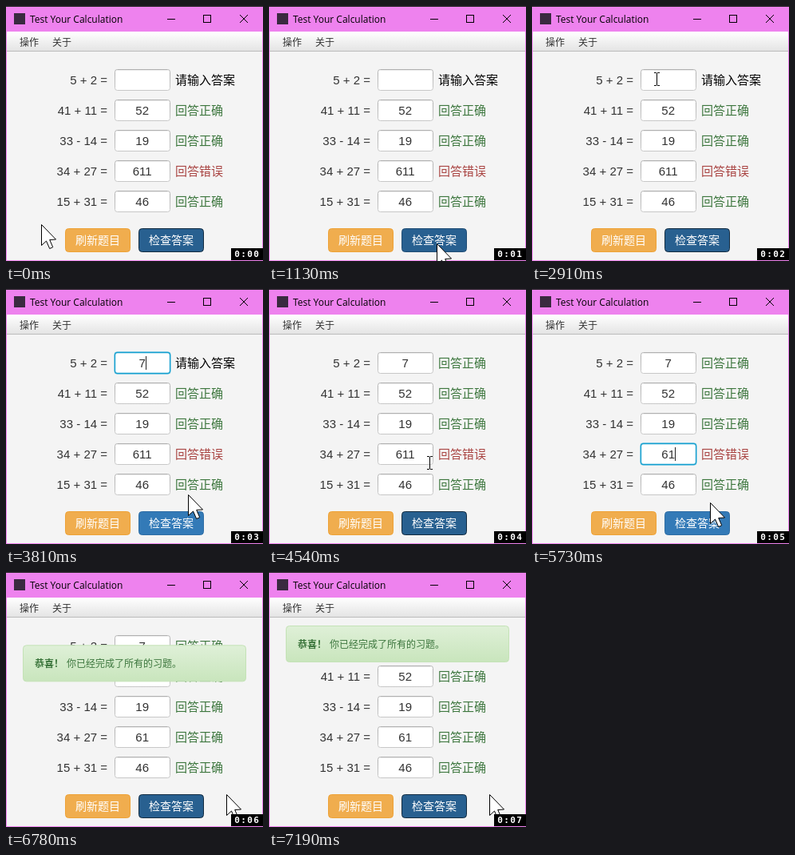
An HTML page with a canvas for the animation above (8000 ms loop, 322 by 319 pixels).

```html
<!DOCTYPE html>
<html lang="zh-CN">
<head>
<meta charset="utf-8">
<title>Test Your Calculation</title>
<style>
html, body { margin: 0; width: 100%; height: 100%; overflow: hidden; }
canvas { display: block; width: 322px; height: 319px; }
</style>
</head>
<body>
<canvas id="stage" width="322" height="319"></canvas>
<script>
const ctx = document.getElementById('stage').getContext('2d');
const LOOP = 8000;
const CJK = '"Noto Sans CJK SC", "Noto Sans CJK", sans-serif';
const ARIAL = '"Liberation Sans", Arial, sans-serif';
const GREEN = '#3c763d', RED = '#a94442';
const INPUT = { x: 136, y: 79, w: 70, h: 27, step: 38 };
const CHECK = { x: 166, y: 278, w: 82, h: 30 };

// Key moments in ms
const FIRST = { row: 0, focus: 2930, hide: 3250, type: 3580, submit: 3980 };
const SECOND = { row: 3, focus: 4810, hide: 5340, type: 5490, submit: 5960 };
const EDITS = [FIRST, SECOND];
const ALERT = 6180;

// Pointer moves; lift is the height of the arc
const HOME = { x: 44, y: 273 };
const MOVES = [
  { from: 650, to: 1110, x: 210, y: 297, lift: 56 },
  { from: 1500, to: 2260, x: 213, y: 275, lift: 192 },
  { from: 2310, to: 2800, x: 157, y: 91 },
  { from: FIRST.type, to: 3800, x: 228, y: 257 },
  { from: 3820, to: 3940, x: 224, y: 282 },
  { from: 4050, to: 4560, x: 202, y: 217 },
  { from: SECOND.type, to: 5720, x: 223, y: 267 },
  { from: 5740, to: 5880, x: 231, y: 288 },
  { from: 6020, to: 6280, x: 276, y: 278 }
];

const between = (t, a, b) => t >= a && t < b;
const mix = (a, b, p) => a + (b - a) * p;
const smooth = p => p * p * (3 - 2 * p);
const inside = (p, r, pad = 0) =>
  between(p.x, r.x - pad, r.x + r.w + pad) && between(p.y, r.y - pad, r.y + r.h + pad);
const inputRect = i => ({ ...INPUT, y: INPUT.y + i * INPUT.step });
const activeEdit = t => EDITS.find(e => between(t, e.focus, e.submit));

function text(str, x, y, font, color, align = 'left') {
  ctx.font = font;
  ctx.fillStyle = color;
  ctx.textAlign = align;
  ctx.fillText(str, x, y);
}

function rect(x, y, w, h, color) {
  ctx.fillStyle = color;
  ctx.fillRect(x, y, w, h);
}

function box({ x, y, w, h }, radius, fill, stroke, line = 1) {
  ctx.beginPath();
  ctx.roundRect(x + 0.5, y + 0.5, w - 1, h - 1, radius);
  ctx.fillStyle = fill;
  ctx.fill();
  ctx.strokeStyle = stroke;
  ctx.lineWidth = line;
  ctx.stroke();
}

function line(x0, y0, x1, y1) {
  ctx.beginPath();
  ctx.moveTo(x0, y0);
  ctx.lineTo(x1, y1);
  ctx.strokeStyle = '#000';
  ctx.lineWidth = 1;
  ctx.stroke();
}

function fade(y0, y1, from, to) {
  const g = ctx.createLinearGradient(0, y0, 0, y1);
  g.addColorStop(0, from);
  g.addColorStop(1, to);
  return g;
}

function pointerAt(t) {
  let pos = HOME;
  for (const { from, to, x, y, lift = 0 } of MOVES) {
    if (t < from) break;
    const p = smooth(Math.min(1, (t - from) / (to - from)));
    pos = { x: mix(pos.x, x, p), y: mix(pos.y, y, p) - lift * Math.sin(Math.PI * p) };
  }
  return pos;
}

// Cubic bezier ease (0.215, 0.61, 0.355, 1)
function easeOut(p) {
  const curve = (s, a, b) => 3 * s * (1 - s) ** 2 * a + 3 * s * s * (1 - s) * b + s ** 3;
  let lo = 0, hi = 1;
  for (let i = 0; i < 24; i++) {
    const mid = (lo + hi) / 2;
    if (curve(mid, 0.215, 0.355) < p) lo = mid; else hi = mid;
  }
  return curve(lo, 0.61, 1);
}

function bounceDown(ms) {
  const keys = [[0, -2000], [600, 25], [750, -10], [900, 5], [1000, 0]];
  const n = keys.findIndex(k => k[0] > ms);
  if (n < 0) return 0;
  const [t0, y0] = keys[n - 1], [t1, y1] = keys[n];
  return mix(y0, y1, easeOut((ms - t0) / (t1 - t0)));
}

function drawWindow() {
  rect(0, 0, 322, 319, '#ee82ee');
  rect(0, 0, 322, 1, '#222');
  rect(1, 32, 320, 286, '#f4f4f4');
  rect(10, 9, 14, 14, '#3a2a40');
  text('Test Your Calculation', 30, 21, '12px "Open Sans", "Noto Sans", sans-serif', '#000');
  line(202, 16.5, 212, 16.5);
  ctx.strokeRect(247.5, 11.5, 9, 9);
  line(293, 11, 303, 21);
  line(303, 11, 293, 21);

  rect(1, 32, 320, 24, fade(32, 56, '#ffffff', '#e4e4e4'));
  rect(1, 56, 320, 1, '#bcbcbc');
  text('操作', 17, 50, '12px ' + CJK, '#333');
  text('关于', 58, 50, '12px ' + CJK, '#333');
}

function drawInput(i, value, focused, caret) {
  const r = inputRect(i);
  const { x, y, w, h } = r;
  if (focused) {
    const halo = { x: x - 1, y: y - 1, w: w + 2, h: h + 2 };
    box(halo, 4, 'rgba(3,158,211,.12)', 'rgba(3,158,211,.3)');
    box(r, 3, '#fff', '#159fce', 1.3);
  } else {
    box(r, 3, '#fff', fade(y, y + h, '#b0b0b0', '#c8c8c8'));
    rect(x + 2, y + 1, w - 4, 1, '#ededed');
  }
  text(value, 170.7, y + 19, '15px ' + ARIAL, '#333', 'center');
  if (caret) {
    const end = 170.7 + ctx.measureText(value).width / 2;
    rect(Math.round(end), y + 5, 1, 17, '#222');
  }
}

function noteFor(a, b, answer) {
  if (answer === '') return ['请输入答案', '#000'];
  return a + b === Number(answer) ? ['回答正确', GREEN] : ['回答错误', RED];
}

function drawRows(t) {
  const terms = [[5, 2], [41, 11], [33, -14], [34, 27], [15, 31]];
  const before = { 0: '', 3: '611' };
  const edit = activeEdit(t);
  terms.forEach(([a, b], i) => {
    const own = EDITS.find(e => e.row === i);
    const answerSince = key => own && t < own[key] ? before[i] : String(a + b);
    const focused = edit !== undefined && edit === own;
    const caret = focused && (t >= own.type || t < own.focus + 500);
    const base = 98 + i * INPUT.step;
    const [note, color] = noteFor(a, b, answerSince('submit'));
    text(`${a} ${b < 0 ? '-' : '+'} ${Math.abs(b)} =`, 127, base, '15px ' + ARIAL, '#333', 'right');
    drawInput(i, answerSince('type'), focused, caret);
    text(note, 212, base, '15px ' + CJK, color);
  });
}

function drawButton(r, label, fill, stroke) {
  box(r, 4, fill, stroke);
  text(label, r.x + r.w / 2, r.y + 20, '14px ' + CJK, '#fff', 'center');
}

function drawButtons(t, pointer) {
  const hover = inside(pointer, CHECK, 5);
  let fill = '#286090', stroke = hover ? '#204d74' : '#122b40';
  if (activeEdit(t) && !inside(pointer, CHECK)) {
    fill = '#337ab7';
    stroke = '#2e6da4';
  }
  drawButton({ ...CHECK, x: 74 }, '刷新题目', '#f0ad4e', '#eea236');
  drawButton(CHECK, '检查答案', fill, stroke);
}

function drawAlert(t) {
  if (t < ALERT) return;
  const y = 67 + bounceDown(t - ALERT);
  ctx.save();
  ctx.beginPath();
  ctx.rect(1, 32, 320, 286);
  ctx.clip();
  ctx.globalAlpha = easeOut(Math.min(1, (t - ALERT) / 600));
  box({ x: 21, y, w: 280, h: 46 }, 4, fade(y, y + 46, '#dff0d8', '#c8e5bc'), '#c4e2b6');
  text('恭喜！', 36, y + 27.5, 'bold 12px ' + CJK, GREEN);
  text('你已经完成了所有的习题。', 76, y + 27.5, '12px ' + CJK, GREEN);
  ctx.restore();
}

function drawBeam() {
  rect(-1, -7, 1, 15, '#000');
  for (const side of [-4, 0]) {
    rect(side, -8, 3, 1, '#000');
    rect(side, 8, 3, 1, '#000');
  }
}

function drawArrow() {
  const outline = [[0, 0], [0, 26], [6, 20.5], [10.2, 30], [14.2, 28.2], [10.2, 19], [18, 18.5]];
  ctx.beginPath();
  outline.forEach(([x, y]) => ctx.lineTo(x + 0.5, y + 0.5));
  ctx.closePath();
  ctx.fillStyle = '#fff';
  ctx.fill();
  ctx.strokeStyle = '#000';
  ctx.lineWidth = 1;
  ctx.stroke();
}

function drawPointer(t, pointer) {
  if (EDITS.some(e => between(t, e.hide, e.type))) return;
  const overInput = [0, 1, 2, 3, 4].some(i => inside(pointer, inputRect(i)));
  ctx.save();
  ctx.translate(Math.round(pointer.x), Math.round(pointer.y));
  if (overInput) drawBeam(); else drawArrow();
  ctx.restore();
}

function drawClock(t) {
  rect(282, 303, 40, 15, '#000');
  const label = '0:0' + Math.min(7, Math.floor((t + 30) / 1000));
  [...label].forEach((ch, i) =>
    text(ch, 289.5 + 8 * i, 314, 'bold 11px "DejaVu Sans Mono", monospace', '#fff', 'center'));
}

function draw(t) {
  const pointer = pointerAt(t);
  drawWindow();
  drawRows(t);
  drawButtons(t, pointer);
  drawAlert(t);
  drawPointer(t, pointer);
  drawClock(t);
}

const start = performance.now();
function tick() {
  draw((performance.now() - start) % LOOP);
  requestAnimationFrame(tick);
}
tick();
</script>
</body>
</html>
```
